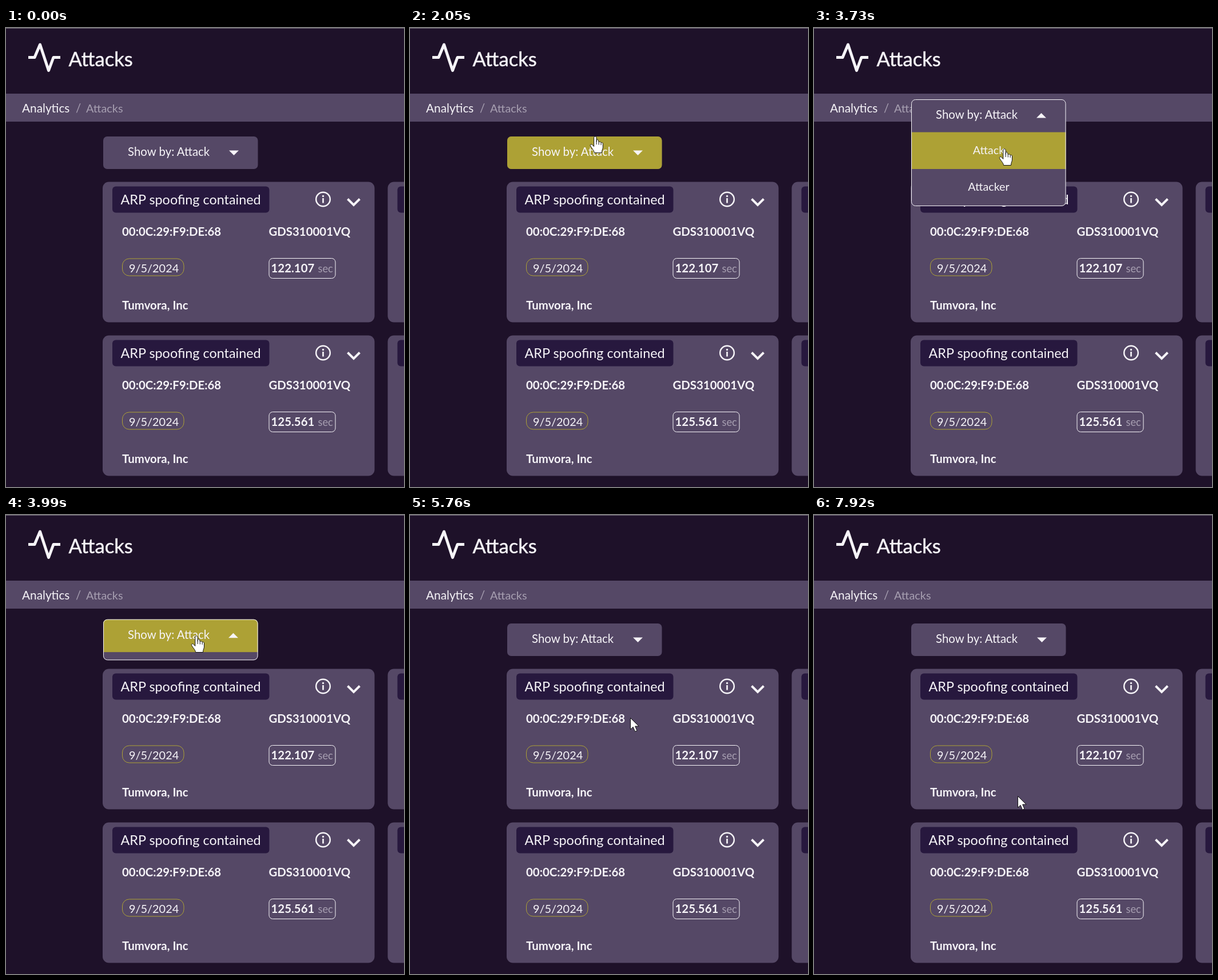
Recreate the animation shown at these times as an HTML page. Size 696 px wide and 804 px high, loop 8000 ms.

```html
<!DOCTYPE html>
<html lang="en">
<head>
<meta charset="utf-8">
<title>Attacks</title>
<style>
html, body { margin: 0; width: 100%; height: 100%; overflow: hidden; background: #1e1129; }
svg { display: block; width: 696px; height: 804px; font: 20.4px Lato, "Open Sans", sans-serif; fill: #f6f4f8; }
.panel { fill: #554866; }
.badge { fill: #27183e; }
.muted { fill: #a79fb1; }
.bold { font-weight: 700; }
.line { fill: none; stroke: #f6f4f8; }
.mid { text-anchor: middle; }
.cursor { fill: #fff; stroke: #111; stroke-linejoin: round; }
</style>
</head>
<body>
<svg viewBox="0 0 696 804">
  <defs><clipPath id="clip"><rect id="clipBox" x="170" width="270.5" rx="7"/></clipPath></defs>
  <rect width="696" height="804" fill="#1e1129"/>
  <rect width="696" height="1" fill="#716a78"/>
  <path class="line" stroke-width="5" stroke-linejoin="round" d="M39 51.5H50L59.5 29 74.5 74.500 83 51.500H95"/>
  <text x="109.500" y="67" font-size="34.600" stroke="#f6f4f8" stroke-width=".5">Attacks</text>
  <rect class="panel" y="115" width="696" height="49"/>
  <text x="28" y="147.500" font-size="20.800">Analytics</text>
  <text class="muted" x="122" y="147.500">/</text>
  <text class="muted" x="140" y="147.500" font-size="19.900">Attacks</text>
  <g id="cards"></g>
  <g clip-path="url(#clip)">
    <g id="menu">
      <rect class="panel" x="170" width="271" height="187"/>
      <rect id="hover" x="170" width="271" fill="#ada135"/>
      <text x="213" y="34">Show by: Attack</text>
      <path id="caret"/>
      <text class="mid" x="305.500" y="95.500" font-size="19.700">Attack</text>
      <text class="mid" x="305.500" y="160" font-size="19.700">Attacker</text>
    </g>
  </g>
  <rect id="outline" class="line" x="170.500" width="269.500" rx="7"/>
  <circle id="click" r="17" fill="#fff" fill-opacity=".25"/>
  <path id="arrow" class="cursor" d="M.5.500V20.500L5.200 16.300 8.500 24.300 12 22.800 8.700 15H15.200Z"/>
  <g id="hand" class="cursor">
    <path d="M-2.200 1.800C-2.200-.8 2.200-.8 2.200 1.800V9.500C3-.0 6 7.500 6.300 10.300 7.300 8.300 10 8.800 10.200 11.300 11.300 9.800 13.500 10.500 13.500 13V19C13.500 22 11.500 23.500 11.500 28.500H-1.500C-1.500 25-5 22-8.300 16.500-9.700 14-6.500 12.500-4.500 15L-2.200 17.500Z"/>
    <path fill="none" d="M2.200 9.500V14M6.300 10.500V14.500M10.200 11.500V15"/>
  </g>
</svg>
<script>
const el = id => document.getElementById(id);
const set = (id, attrs) => {
  for (const name in attrs) el(id).setAttribute(name, attrs[name]);
};

const card = (x, y, seconds) => `<g transform="translate(${x} ${y})">
  <rect class="panel" width="475.500" height="246" rx="11"/>
  <rect class="badge" x="17" y="8" width="274.500" height="46" rx="6"/>
  <text x="31.500" y="39" font-size="23.400">ARP spoofing contained</text>
  <circle class="line" cx="385.500" cy="30.500" r="12.300" stroke-width="2.500"/>
  <circle cx="385.500" cy="25" r="1.700"/>
  <path class="line" stroke-width="2.700" d="M385.500 28.500V37"/>
  <path class="line" stroke-width="4" d="M428.500 30L439 40.500 449.500 30"/>
  <g class="bold">
    <text x="34" y="94">00:0C:29:F9:DE:68</text>
    <text x="290.500" y="94">GDS310001VQ</text>
    <text x="294.500" y="158.500">${seconds}</text>
    <text x="34" y="223">Tumvora, Inc</text>
  </g>
  <rect class="line" style="stroke:#ada135" x="34.500" y="134.500" width="107.500" height="30" rx="12"/>
  <text x="46" y="158.500" font-size="19.900">9/5/2024</text>
  <rect class="line" x="291" y="134" width="116" height="35" rx="6.500"/>
  <text class="muted" x="376.500" y="158.500" font-size="18.300">sec</text>
</g>`;
el("cards").innerHTML = [[269.5, "122.107"], [538.5, "125.561"]]
  .map(([y, seconds]) => card(169, y, seconds) + card(667.5, y, seconds)).join("");

// Pointer tip: time, x, y
const path = [
  [450, 520, 725], [590, 194, 308], [850, 194, 308], [1190, 86, 256],
  [1460, 86, 256], [1520, 106, 243], [1800, 230, 159], [2260, 402, 216],
  [3320, 402, 216], [3390, 333, 212], [4000, 333, 212], [4390, 459, 290],
  [4600, 459, 290], [4660, 457, 290], [4730, 500, 211], [4810, 549, 360],
  [4900, 400, 546], [5030, 214, 330], [5230, 214, 330], [5300, 130, 211],
  [5380, 74, 320], [5560, 436, 340], [5760, 385, 355], [6250, 385, 355],
  [6720, 336, 417], [7520, 336, 417], [7920, 356, 492]
];

function pointerAt(t) {
  const i = path.findIndex(key => key[0] > t);
  if (i < 0) return path[path.length - 1].slice(1);
  if (i === 0) return [-99, -99];
  const [t0, x0, y0] = path[i - 1], [t1, x1, y1] = path[i];
  const k = (t - t0) / (t1 - t0);
  return [x0 + (x1 - x0) * k, y0 + (y1 - y0) * k];
}

function smooth(t, from, to) {
  const k = Math.min(1, Math.max(0, (t - from) / (to - from)));
  return k * k * (3 - 2 * k);
}

function draw(t) {
  const open = smooth(t, 2500, 2830) - smooth(t, 3730, 4060);
  const height = 57 + 130 * open, top = 218.5 - height / 2;
  const [x, y] = pointerAt(t);
  const over = x > 170 && x < 440 && y > top && y < top + height;
  const row = y < top + 57.5 ? 0 : y < top + 122 ? 1 : 2;
  const at = `translate(${x} ${y})`;

  set("clipBox", { y: top, height });
  set("menu", { transform: `translate(0 ${top})` });
  set("hover", {
    y: [0, 57.5, 122][row], height: row ? 64.5 : 57.5,
    visibility: over ? "visible" : "hidden"
  });
  set("caret", { d: open > 0 ? "M389 32.500L397.500 24 406 32.500Z" : "M390 24.500H407L398.500 33Z" });
  set("outline", { y: top + .5, height: height - 1, visibility: open > 0 ? "visible" : "hidden" });
  set("click", { transform: at, visibility: t >= 3590 && t < 3730 ? "visible" : "hidden" });
  set("arrow", { transform: at, visibility: over ? "hidden" : "visible" });
  set("hand", { transform: at, visibility: over ? "visible" : "hidden" });
}

const start = performance.now();
function tick() {
  draw((performance.now() - start) % 8000);
  requestAnimationFrame(tick);
}
tick();
</script>
</body>
</html>
```
